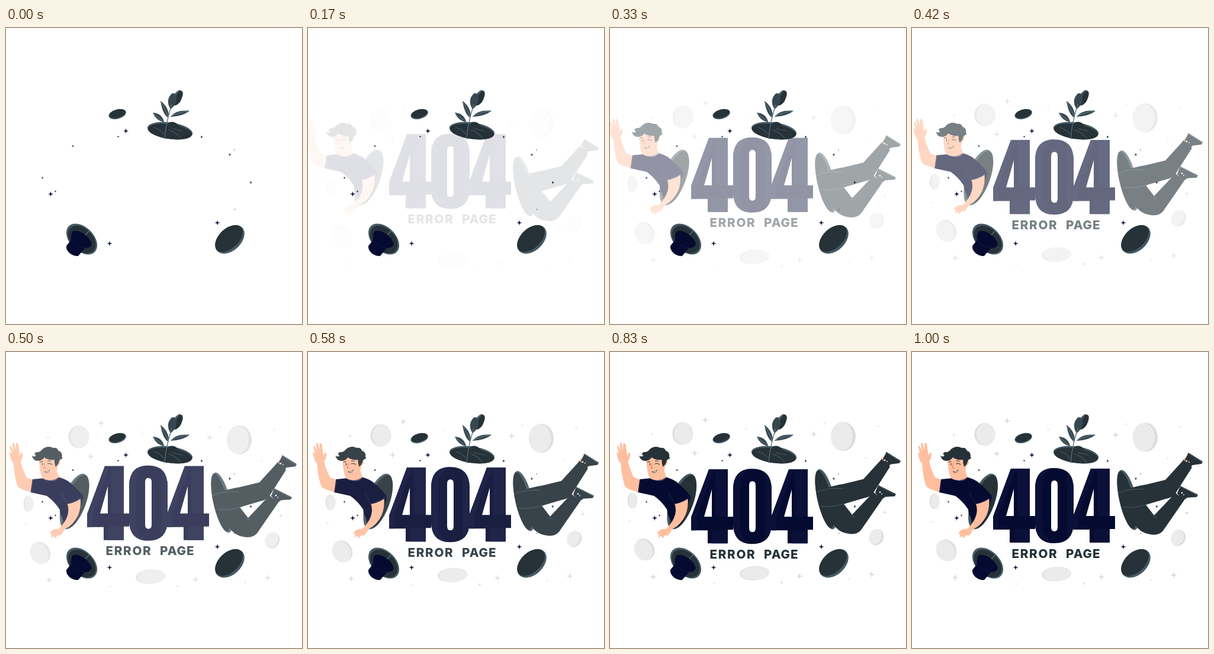
Write an HTML page that moves like this. It is 500 px wide and 500 px high and loops after 1040 ms.

```html
<!DOCTYPE html>
<html lang="en">
<head>
<meta charset="utf-8">
<title>404</title>
<style>
html, body { margin: 0; width: 100%; height: 100%; overflow: hidden; background: #fff; }
svg { display: block; width: 100vw; height: 100vh; }
.navy { fill: #050a30; }
.ink { fill: #263238; }
.slate { fill: #455a64; }
.skin { fill: #ffbe9d; }
.line { fill: none; stroke-linecap: round; stroke-linejoin: round; }
text { font: 800 20.6px Inter, sans-serif; fill: #263238; }
</style>
</head>
<body>
<svg viewBox="0 0 500 500">
  <defs>
    <path id="four" fill-rule="evenodd" d="M167 197H199V277H208V299H199V322H165V300H137V278ZM172 231V277H159Z"/>
    <path id="fourFace" d="M167 197H176L146 277V300H137V278ZM172 300H199V322H172ZM178 197H199V277H178Z"/>
  </defs>

  <g id="backdrop"></g>

  <g id="legs">
    <ellipse class="slate" cx="365" cy="250" rx="14.5" ry="52" transform="rotate(-13 365 250)"/>
    <ellipse class="ink" cx="362.500" cy="250" rx="12" ry="50" transform="rotate(-13 362.5 250)"/>
    <path class="skin" d="M457 183L462 177L474 188L468 195ZM447 238L451 232L463 243L458 249Z"/>
    <path class="ink" d="M350 238Q365 229 395 224L428 216L459 182L473 195L445 239Q440 246 429 248L395 258L409 276L445 238L460 250L424 302Q416 311 402 308Q386 306 377 292L357 263Z"/>
    <path class="ink" d="M461 182L467 170L491 185L489 189L474 191L469 196ZM448 239L453 226L483 241L481 245L465 246L458 251Z"/>
    <path class="line" stroke="#455a64" stroke-width="1" d="M349 238Q364 230 393 232M357 262Q378 264 398 257M466 171L490 186M453 227L482 242M408 278L413 280"/>
    <g fill="#fff">
      <circle cx="464" cy="184" r="1.300"/><circle cx="468" cy="186" r=".9"/>
      <circle cx="456" cy="238" r="1.300"/><circle cx="459" cy="241" r=".9"/>
    </g>
  </g>

  <g id="man">
    <ellipse class="slate" cx="120" cy="252.500" rx="19.600" ry="49.500" transform="rotate(20 120 252.5)"/>
    <ellipse class="ink" cx="122" cy="253" rx="17" ry="47.500" transform="rotate(20 122 253)"/>
    <path class="skin" d="M50 216L39 212Q32 198 29 185Q33 179 33 171Q31 168 28 175L25 156Q23 152 21 155L21 166L18 154Q15 152 15 156L17 168L13 159Q10 158 11 162L14 172L11 169Q9 170 11 174Q12 184 17 188Q18 207 23 224Q25 230 32 232L52 239Z"/>
    <path class="navy" d="M49 215L70 213L91 211Q105 214 113 221Q127 233 135 245L124 282Q113 303 104 288Q95 275 95 266Q85 251 73 243L46 237Z"/>
    <path class="skin" d="M72 207L90 200L94 212Q84 222 68 214Z"/>
    <path class="skin" d="M60 180Q61 205 66 213Q72 219 81 212Q90 206 92 192Q98 188 95 184L88 176Z"/>
    <path class="ink" d="M59 184Q50 184 48 175Q52 178 55 175Q50 171 56 169Q62 170 66 164Q75 157 84 162Q91 161 93 167Q98 168 99 174Q98 177 100 180Q95 181 94 185Q93 190 88 194Q86 188 86 182Q75 183 69 178Q66 183 59 184Z"/>
    <path class="line" stroke="#263238" stroke-width="1.100" d="M62 186L66 185M75 184L80 184M75 189Q78 187 82 190M66 188V191"/>
    <path class="line" stroke="#d9765e" stroke-width="1" d="M70 188L68 196L71 196"/>
    <path d="M69 202Q74 204 78 199Q77 207 69 202Z" fill="#fff" stroke="#263238" stroke-width=".7"/>
    <path class="skin" d="M107 254L130 245Q132 262 126 276Q119 292 104 299L99 307Q96 312 92 309L88 314Q85 315 86 310L82 313Q79 312 82 307Q78 309 79 305Q83 298 93 299Q101 292 106 282Q113 268 107 254Z"/>
    <path class="navy" d="M100 218Q119 222 135 244Q124 254 108 257Q102 246 97 236Z"/>
    <path class="line" stroke="#1c2254" stroke-width="1" d="M50 217L48 236M108 256Q123 252 134 244M97 237L107 255M66 214Q79 222 94 212"/>
  </g>

  <g id="digits">
    <g class="navy">
      <use href="#four"/>
      <use href="#four" x="135"/>
      <path fill-rule="evenodd" d="M208 231Q208 196 240.500 196Q273 196 273 231V288Q273 323 240.500 323Q208 323 208 288ZM235 224V296Q235 303 240.500 303Q246 303 246 296V224Q246 217 240.500 217Q235 217 235 224Z"/>
    </g>
    <g fill="#0b1038">
      <use href="#fourFace"/>
      <use href="#fourFace" x="135"/>
      <path d="M240 196Q208 196 208 231V288Q208 323 240 323Q220 317 220 288V231Q220 202 240 196ZM262 206Q273 214 273 231V288Q273 305 262 314Z"/>
    </g>
  </g>

  <g id="caption">
    <text x="168.500" y="347.500" letter-spacing="1.700">ERROR</text>
    <text x="260" y="347.500" letter-spacing="1">PAGE</text>
  </g>

  <g id="still">
    <g transform="rotate(8 277 174)">
      <ellipse class="slate" cx="277" cy="173.500" rx="38.500" ry="14"/>
      <ellipse class="ink" cx="277" cy="175" rx="37.500" ry="12.500"/>
    </g>
    <path class="line" stroke="#455a64" stroke-width="1.200" d="M250 168Q262 172 266 179M275 172Q288 177 295 186M281 170L298 174"/>
    <path class="ink" d="M273 161Q284 154 293 167Z"/>
    <path class="slate" d="M284 131Q277 114 292 105Q304 105 295 123Q291 130 284 131Z"/>
    <path class="ink" d="M284 131Q283 116 294 106Q302 106 295 123Q291 130 284 131Z"/>
    <path fill="#37474f" stroke="#455a64" stroke-width=".7" d="M278 137Q269 122 280 111Q289 108 287 123Q285 132 278 137Z"/>
    <g fill="#37474f">
      <path d="M273 151Q264 144 261 123Q274 133 275 147Z"/>
      <path d="M268 160Q253 156 248 143Q263 144 267 158Z"/>
      <path d="M278 150Q287 137 310 140Q299 149 278 150Z"/>
    </g>
    <path class="line" stroke="#546e7a" stroke-width="1.300" d="M268 187Q270 160 280 129M262 125Q270 139 274 150M250 145L268 160M279 149Q293 142 308 140"/>

    <g transform="rotate(-15 188 145)">
      <ellipse class="slate" cx="188" cy="145.500" rx="15" ry="8"/>
      <ellipse class="ink" cx="188.300" cy="144.800" rx="14" ry="6.800"/>
    </g>
    <g transform="rotate(-43 378 357)">
      <ellipse class="slate" cx="378" cy="357" rx="29" ry="19"/>
      <ellipse class="ink" cx="378" cy="355" rx="28" ry="16.500"/>
    </g>
    <g transform="rotate(45 128 356.500)">
      <ellipse class="slate" cx="128" cy="356.500" rx="31" ry="20"/>
      <ellipse class="ink" cx="128.500" cy="357" rx="27.500" ry="18.500"/>
    </g>
    <path class="line" stroke="#546e7a" stroke-width="1.500" d="M131 353L140 343"/>
    <path class="navy" d="M113 343Q121 341 132 348Q143 356 145 365Q143 372 133 372L122 385Q114 386 107 380Q101 374 102 368L110 358Q109 348 113 343Z"/>
    <path class="line" stroke="#151b4c" stroke-width=".8" d="M110 359Q117 369 133 372"/>
  </g>
</svg>
<script>
const LOOP = 1040, STEPS = 25, SHIFT = 20;
const byId = id => document.getElementById(id);

const star = ([x, y, r], fill) => {
  const c = r * 0.22;
  const points = [[0, -r], [c, -c], [r, 0], [c, c], [0, r], [-c, c], [-r, 0], [-c, -c]];
  return `<polygon fill="${fill}" points="${points.map(([a, b]) => [x + a, y + b]).join(' ')}"/>`;
};

const paleCoin = ([x, y, rx, ry, angle, rim]) =>
  `<g transform="rotate(${angle} ${x} ${y})">
    <ellipse cx="${x}" cy="${y}" rx="${rx}" ry="${ry}" fill="#dcdcdc"/>
    <ellipse cx="${x + rim}" cy="${y}" rx="${rx - Math.abs(rim)}" ry="${ry - 0.5}" fill="#ebebeb"/>
  </g>`;

const coins = [
  [123, 139, 17.5, 19, 0, 1.5], [394, 144, 21, 24.5, 0, -2.5], [38, 252, 8.5, 13, 0, 1],
  [58, 335, 16.5, 19, -30, -1.5], [450, 314, 12, 14, 25, -1.5], [244, 375, 25, 12, -4, 1]
];
const paleStars = [
  [161, 116, 6], [71, 140, 3], [143, 172, 6], [230, 131, 2.5], [344, 140, 6], [362, 122, 2.5],
  [453, 127, 2.5], [432, 180, 2.5], [464, 272, 4], [73, 381, 6], [176, 392, 2.5],
  [290, 391, 3.5], [320, 380, 6], [404, 385, 2.5], [442, 377, 6], [33, 287, 2.5]
];
const darkStars = [
  [202.5, 174, 4.5], [189.5, 183.5, 2], [113, 199.5, 2.2], [61.5, 253, 2.2], [75.5, 280.5, 4.5],
  [83.5, 276, 2], [330.5, 184, 2.7], [378, 214, 2.8], [386, 206, 1.3], [413.5, 261, 2.8],
  [386.5, 306.5, 1.3], [357, 329, 4.5], [175, 364, 4.5]
];

byId('backdrop').innerHTML = coins.map(paleCoin).join('') + paleStars.map(s => star(s, '#dcdcdc')).join('');
byId('still').innerHTML += darkStars.map(s => star(s, '#050a30')).join('');

// Cubic Bezier easing with a slight overshoot.
const curve = (a, b, s) => 3 * (1 - s) ** 2 * s * a + 3 * (1 - s) * s * s * b + s ** 3;
function ease(x) {
  let low = 0, high = 1;
  for (let i = 0; i < 24; i++) {
    const mid = (low + high) / 2;
    if (curve(0.36, 0.5, mid) < x) low = mid; else high = mid;
  }
  return curve(-0.01, 1.38, low);
}

// Direction each part comes from.
const entries = { backdrop: [0, 1], legs: [0, 1], man: [-1, 0], digits: [0, -1], caption: [0, -1] };
const parts = Object.entries(entries).map(([id, from]) => [byId(id), from]);

function render(time) {
  const step = Math.floor((time % LOOP) / (LOOP / STEPS) + 0.1);
  const progress = step < 2 ? 0 : ease(Math.min(1, (step + 0.5) / 24));
  const offset = SHIFT * (1 - progress);
  for (const [part, [dx, dy]] of parts) {
    part.setAttribute('opacity', Math.min(1, Math.max(0, progress)));
    part.setAttribute('transform', `translate(${dx * offset} ${dy * offset})`);
  }
}

const start = performance.now();
function tick() {
  render(performance.now() - start);
  requestAnimationFrame(tick);
}
tick();
</script>
</body>
</html>
```
